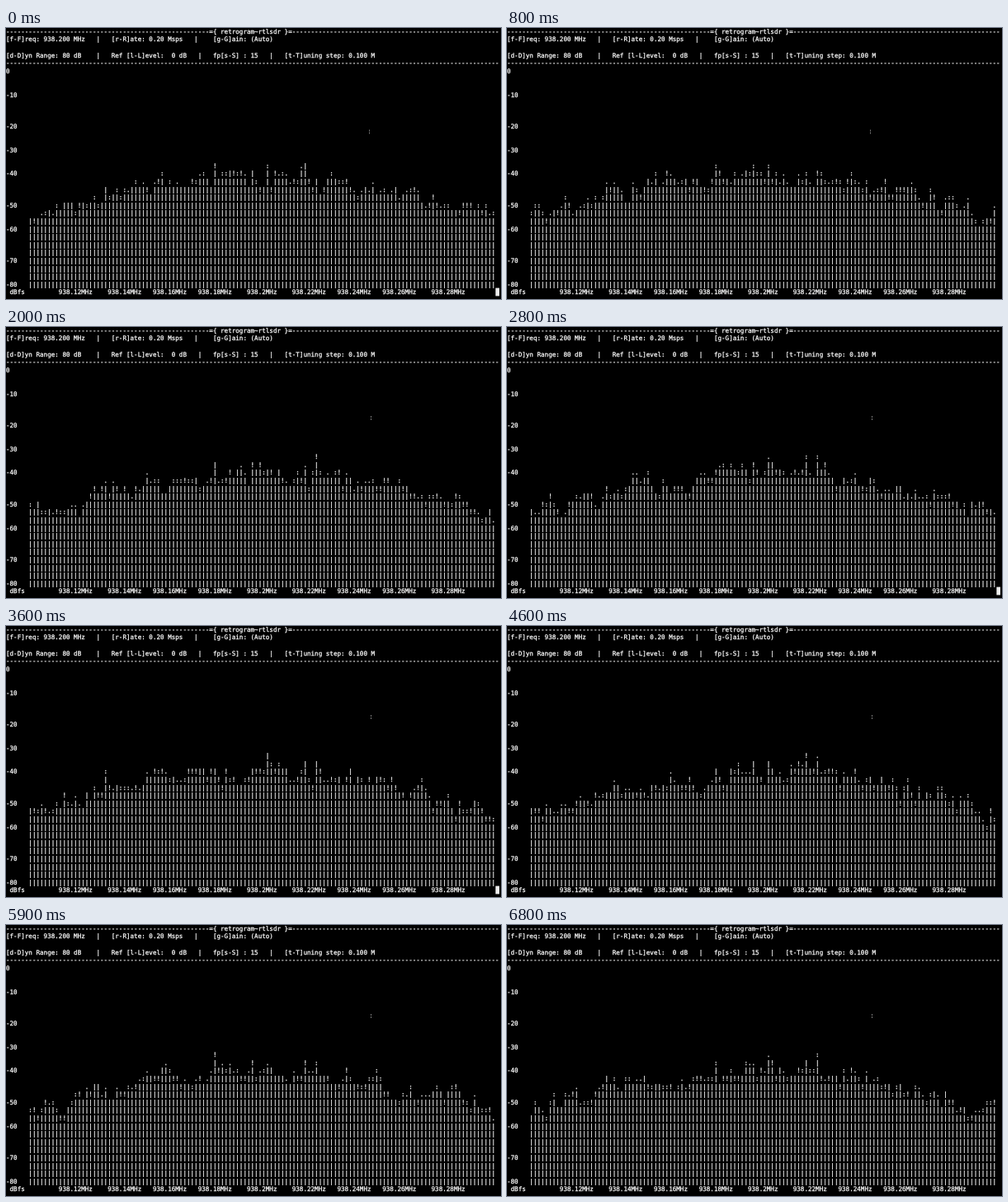
Recreate the animation shown at these times as an HTML page. Size 600 by 329 pixels, loop 6900 ms.

```html
<!DOCTYPE html>
<html lang="en">
<head>
<meta charset="utf-8">
<title>Spectrum terminal</title>
<style>
  html, body { margin: 0; width: 100%; height: 100%; overflow: hidden; background: #000; }
  svg { display: block; width: 100vw; height: 100vh; }
  text {
    font: 7.59px "DejaVu Sans Mono", monospace;
    font-variant-ligatures: none;
    white-space: pre;
    text-rendering: geometricPrecision;
    fill: #fff;
    stroke: #fff;
    stroke-width: 0.25px;
  }
</style>
</head>
<body>
<svg viewBox="0 0 600 329">
  <rect width="600" height="329"/>
  <g id="screen"></g>
  <rect id="cursor" x="593.4" y="315.6" width="4.6" height="9.8" fill="#eee"/>
  <path id="pointer" d="M0 0v5" stroke="#777" stroke-width="1" stroke-dasharray="2 1"/>
</svg>
<script>
const LOOP = 6900, STEP = 100, BLINK = 600, POINTER_MOVE = 1500;
const COLS = 131, ROWS = 34, ROW_HEIGHT = 9.59;
const FIRST_BAR = 6, BARS = 124, TOP_ROW = 5, AXIS_ROW = 33;
const CARRIERS = [20, 49, 59, 63, 73, 76];

const screen = document.getElementById("screen");
const cursor = document.getElementById("cursor");
const pointer = document.getElementById("pointer");

const lines = Array.from({ length: ROWS }, (_, row) => {
  const line = document.createElementNS("http://www.w3.org/2000/svg", "text");
  line.setAttribute("y", 6.8 + row * ROW_HEIGHT);
  return screen.appendChild(line);
});

// Lays out [column, string] pairs on one terminal row
function layout(...parts) {
  return parts.reduce((line, [col, str]) => line.padEnd(col) + str, "");
}

function frequencyLabel(_, i) {
  const mhz = +(938.12 + i * 0.02).toFixed(2);
  return [Math.floor(14.85 + i * 12.3), `${mhz}MHz`];
}

const fixed = Array(ROWS).fill("");
fixed[0] = "-".repeat(54) + "={ retrogram~rtlsdr }=" + "-".repeat(55);
fixed[1] = layout([0, "[f-F]req: 938.200 MHz"], [24, "|"], [28, "[r-R]ate: 0.20 Msps"],
  [50, "|"], [55, "[g-G]ain: (Auto)"]);
fixed[3] = layout([0, "[d-D]yn Range: 80 dB"], [24, "|"], [28, "Ref [l-L]evel:  0 dB"],
  [51, "|"], [55, "fp[s-S] : 15"], [70, "|"], [74, "[t-T]uning step: 0.100 M"]);
fixed[4] = "-".repeat(COLS);
for (let n = 0; n <= 8; n++) fixed[TOP_ROW + Math.round(n * 3.37)] = String(-10 * n || 0);
fixed[AXIS_ROW] = layout([1, "dBfs"], ...Array.from({ length: 9 }, frequencyLabel));
lines.forEach((line, row) => { line.textContent = fixed[row]; });

function seededRandom(seed) {
  return () => {
    seed = (seed + 0x6D2B79F5) | 0;
    let v = Math.imul(seed ^ (seed >>> 15), seed | 1);
    v ^= v + Math.imul(v ^ (v >>> 7), v | 61);
    return ((v ^ (v >>> 14)) >>> 0) / 4294967296;
  };
}

// Bar heights in rows: an arch, steady carriers and noise shared by neighbours
function barHeights(step) {
  const random = seededRandom(step * 7919 + 17);
  let drift = 0;
  return Array.from({ length: BARS }, (_, i) => {
    drift = drift * 0.45 + (random() + random() - 1) * 1.7;
    const arch = 9.2 + 5 * Math.sin(Math.PI * i / (BARS - 1));
    return arch + drift + (CARRIERS.includes(i) ? 1.4 : 0);
  });
}

function barGlyph(height, level) {
  const fill = height - level;
  if (fill >= 1) return "|";
  return fill > 0 ? ".:!|"[Math.floor(fill * 4)] : " ";
}

function drawSpectrum(step) {
  const heights = barHeights(step);
  for (let row = TOP_ROW; row < AXIS_ROW; row++) {
    const level = AXIS_ROW - 1 - row;
    lines[row].textContent = fixed[row].padEnd(FIRST_BAR) +
      heights.map(height => barGlyph(height, level)).join("");
  }
}

let shownStep = -1;
function render(time) {
  const step = Math.floor(time / STEP);
  if (step !== shownStep) drawSpectrum(shownStep = step);
  cursor.setAttribute("visibility", time % (2 * BLINK) < BLINK ? "visible" : "hidden");
  pointer.setAttribute("transform", time < POINTER_MOVE ? "translate(440.5 123.5)" : "translate(442.5 108)");
}

const start = performance.now();
function tick() {
  render((performance.now() - start) % LOOP);
  requestAnimationFrame(tick);
}
tick();
</script>
</body>
</html>
```
